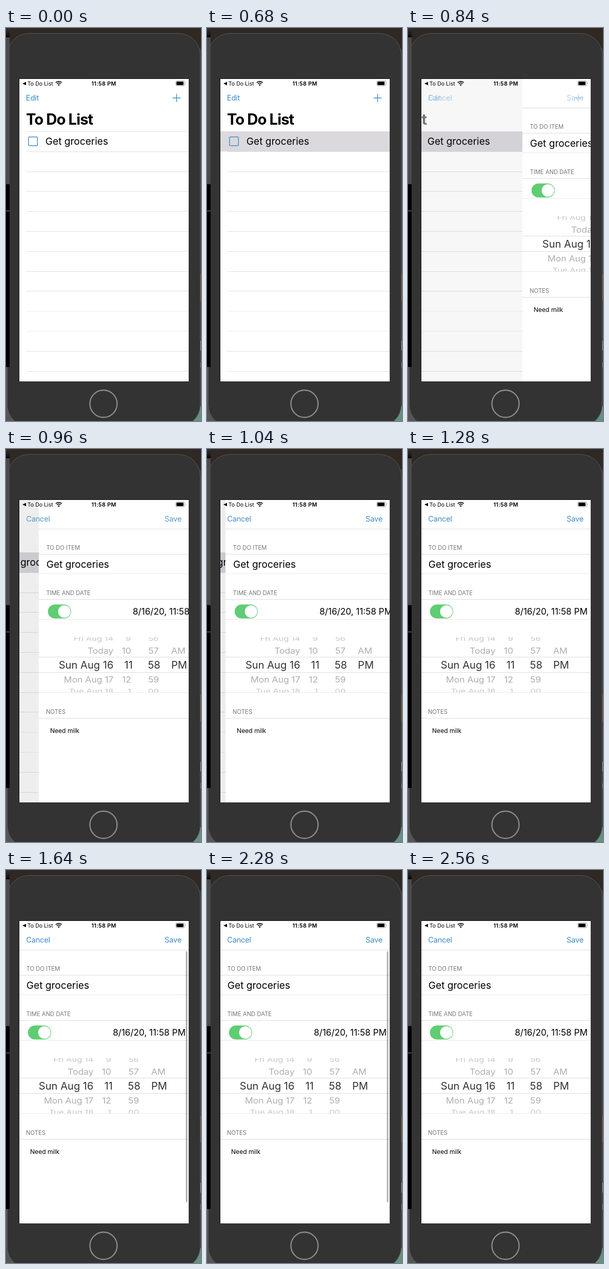
An HTML page that plays this animation: 380 px wide and 764 px high, repeating every 2920 ms.

```html
<!DOCTYPE html>
<html lang="en">
<head>
<meta charset="utf-8">
<title>To-do app</title>
<style>
  html, body { margin: 0; width: 100%; height: 100%; overflow: hidden; background: #333; }
  svg { display: block; width: 100%; height: 100%; }
  text { font-family: Inter, "Liberation Sans", sans-serif; white-space: pre; }
  .nav { font-size: 14.7px; letter-spacing: -.25px; fill: #3d8cc8; }
  .head { font-size: 11.25px; fill: #77777b; }
  .item { font-size: 19.1px; }
  .title { font-size: 29.3px; font-weight: 700; letter-spacing: -.95px; }
</style>
</head>
<body>
<svg viewBox="0 0 380 764">
  <defs>
    <clipPath id="screen"><rect x="26" y="99" width="330" height="588"/></clipPath>
    <clipPath id="wheel"><rect x="25" y="365.5" width="331" height="107.5"/></clipPath>
    <linearGradient id="top" x2="0" y2="1">
      <stop stop-color="#333"/><stop offset=".75" stop-color="#151515"/><stop offset="1" stop-color="#000"/>
    </linearGradient>
  </defs>

  <!-- desktop behind the phone -->
  <rect width="380" height="764" fill="#2f2823"/>
  <rect y="659" width="30" height="105" fill="#555"/>
  <rect x="376" y="40" width="4" height="724" fill="#3b3b3b"/>
  <rect x="376" y="478" width="4" height="52" fill="#8a5a26"/>
  <rect x="376" y="608" width="4" height="19" fill="#9a9a9a"/>
  <rect x="376" y="650" width="4" height="10" fill="#777"/>
  <rect x="340" y="735" width="40" height="29" fill="#649180"/>

  <!-- phone body -->
  <rect x="2.5" y="10.5" width="376" height="764" rx="42" fill="#333" stroke="#575757"/>
  <rect width="7" height="18" fill="url(#top)"/>
  <rect y="18" width="7" height="286" fill="#4b4b4b"/>
  <rect y="303.5" width="7" height="355.5" fill="#000"/>
  <rect y="355" width="7" height="1.2" fill="#777"/>
  <circle cx="190" cy="730.5" r="26.5" fill="none" stroke="#8b8b8b" stroke-width="2.4"/>
  <rect x="25" y="98" width="331" height="589" fill="#0c0c0c"/>

  <g clip-path="url(#screen)">
    <g id="list">
      <rect x="25" y="98" width="331" height="590" fill="#fff"/>
      <g id="rows"></g>
      <rect id="pick" x="25" y="201" width="331" height="39" fill="#dbd8de"/>
      <rect x="43.9" y="211.7" width="17.4" height="17" rx="2" fill="none" stroke="#4a8fc6" stroke-width="1.5"/>
      <text class="item" x="76.8" y="226.7">Get groceries</text>
    </g>
    <rect id="dim" x="25" y="98" width="331" height="590"/>
    <text id="title" class="title" x="39" y="187.5">To Do List</text>

    <g id="page">
      <rect x="25" y="98" width="331" height="590" fill="#fff"/>
      <g id="rules"></g>
      <text class="head" x="39.5" y="195.5">TO DO ITEM</text>
      <text class="item" x="39.8" y="230.7">Get groceries</text>
      <text class="head" x="39.5" y="283.7">TIME AND DATE</text>
      <rect x="42.8" y="302.2" width="45.2" height="27.4" rx="13.7" fill="#5fcd73"/>
      <circle cx="74.8" cy="315.9" r="12.2" fill="#fff"/>
      <text x="279" y="321.7" font-size="17.1" text-anchor="middle">8/16/20, 11:58 PM</text>
      <g id="dial" clip-path="url(#wheel)"></g>
      <text class="head" x="39" y="514.7">NOTES</text>
      <text x="47" y="552" font-size="12.1">Need milk</text>
      <rect id="bar" x="350.6" y="158" width="2.8" height="488" rx="1.4" fill="#000"/>
    </g>

    <g id="navList">
      <text class="nav" x="38.8" y="141.3">Edit</text>
      <path d="M324.5 136h16M332.5 128v16" stroke="#3d8cc8" stroke-width="1.4"/>
    </g>
    <g id="navPage">
      <text class="nav" x="39.2" y="141.3">Cancel</text>
      <text class="nav" x="342" y="141.3" text-anchor="end">Save</text>
    </g>

    <!-- status bar -->
    <path d="M32 108l7-3.3v6.6z"/>
    <text x="41.8" y="111.8" font-size="10.6">To Do List</text>
    <path d="M96.9 106.2a8.4 8.4 0 0 1 11.8 0M99.2 108.6a5.2 5.2 0 0 1 7.2 0" fill="none" stroke="#000" stroke-width="1.8"/>
    <path d="M102.8 112.6l-2-2.2a3 3 0 0 1 4 0z"/>
    <text x="190.6" y="111.8" font-size="10.8" font-weight="600" letter-spacing=".32" text-anchor="middle">11:58 PM</text>
    <rect x="330.8" y="102.9" width="17.6" height="9.4" rx="2.4" fill="none" stroke="#8c8c8c" stroke-width=".9"/>
    <rect x="332.2" y="104.3" width="13.8" height="6.6" rx="1.2"/>
    <path d="M349.3 106.1q1.3 1.5 0 3z" fill="#8c8c8c"/>
  </g>
</svg>

<script>
const $ = id => document.getElementById(id);
const LOOP = 2920, STEP = 40, WIDTH = 331, PARALLAX = .294;

function add(parent, tag, attrs, text = '') {
  const el = document.createElementNS('http://www.w3.org/2000/svg', tag);
  for (const k in attrs) el.setAttribute(k, attrs[k]);
  el.textContent = text;
  parent.append(el);
}

const rule = (parent, x, y, fill) =>
  add(parent, 'rect', { x, y, width: 356 - x, height: 1, fill });

for (let i = 0; i < 13; i++)
  rule($('rows'), 39.5, Math.round(201 + i * 38.8), i === 9 || i === 10 ? '#eee' : '#e0e0e0');

for (const y of [155, 204, 292, 404, 434, 523]) rule($('rules'), 25, y, '#dcdcdc');
for (const y of [242, 331, 473]) rule($('rules'), 25, y, '#e9e9e9');

// baseline, size, vertical squeeze, colour, cells
const wheel = [
  [373.3, 16.6, .72, '#c6c6c6', 'Fri Aug 14', '9', '56', ''],
  [397.6, 17.5, .9, '#adadad', 'Today', '10', '57', 'AM'],
  [427.2, 20.1, 1, '#333', 'Sun Aug 16', '11', '58', 'PM'],
  [453.7, 17.5, .9, '#adadad', 'Mon Aug 17', '12', '59', ''],
  [474.6, 16.6, .72, '#c6c6c6', 'Tue Aug 18', '1', '00', '']
];
for (const [y, size, squeeze, fill, ...cells] of wheel) {
  const near = squeeze === 1;
  const cols = [[170.5, 'end'], [near ? 208 : 205, 'end'], [near ? 249.7 : 248.7, 'middle'], [283, 'start']];
  cells.forEach((s, i) => s && add($('dial'), 'text', {
    transform: `translate(${cols[i][0]} ${y}) scale(1 ${squeeze})`,
    'text-anchor': cols[i][1], 'font-size': size, fill
  }, s));
}

const clamp = v => Math.min(1, Math.max(0, v));
const ease = (t, from, to) => {
  const v = clamp((t - from) / (to - from));
  return v * v * (3 - 2 * v);
};

// critically damped push, starting at 768 ms
function push(t) {
  const x = Math.max(0, t - 768) * .0192;
  return t >= 1240 ? 1 : 1 - (1 + x) * Math.exp(-x);
}

const shift = (id, x) => $(id).setAttribute('transform', `translate(${x.toFixed(2)} 0)`);
const fade = (id, v) => $(id).setAttribute('opacity', v.toFixed(3));

function draw(t) {
  const p = push(t);
  shift('page', WIDTH * (1 - p));
  shift('list', -WIDTH * PARALLAX * p);
  shift('title', -WIDTH * p);
  fade('title', clamp(1 - 1.2 * p));
  fade('dim', .075 * p);
  fade('pick', t >= 680 ? 1 : 0);
  fade('navList', clamp(1 - 1.6 * p));
  fade('navPage', p);
  fade('bar', .35 * (ease(t, 1320, 1640) - ease(t, 2240, 2560)));
}

const start = performance.now();
function tick() {
  const t = (performance.now() - start) % LOOP;
  draw(Math.floor(t / STEP) * STEP);
  requestAnimationFrame(tick);
}
tick();
</script>
</body>
</html>
```
